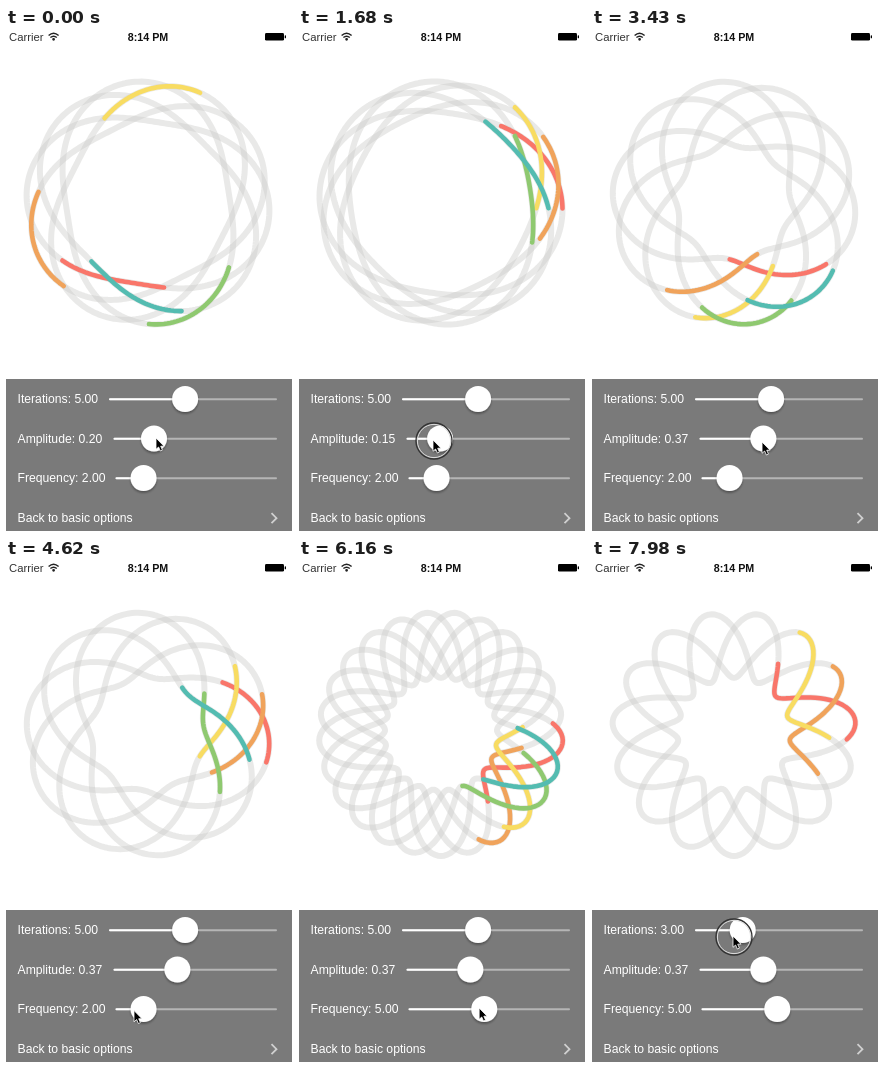
Animation of 287x503 px, one loop 8 s. Source, as an HTML page:

```html
<!DOCTYPE html>
<html lang="en">
<head>
<meta charset="utf-8">
<title>Rosette loader</title>
<style>
  html, body { margin: 0; width: 100%; height: 100%; overflow: hidden; background: #fff; }
  svg { display: block; width: 287px; height: 503px; font-family: "Liberation Sans", Arial, sans-serif; }
  .label { font-size: 12.2px; fill: #fff; }
  .base { fill: none; stroke: rgb(200, 200, 197); stroke-opacity: .4; stroke-width: 6; stroke-linejoin: round; }
  .dash { fill: none; stroke-width: 4.6; stroke-linecap: round; stroke-linejoin: round; }
</style>
</head>
<body>
<svg id="stage" viewBox="0 0 287 503">
  <defs>
    <filter id="shadow" x="-30%" y="-30%" width="160%" height="170%">
      <feDropShadow dx="0" dy="1.8" stdDeviation="1.3" flood-opacity=".35"/>
    </filter>
  </defs>
  <text x="3" y="12.6" font-size="11.3" fill="#333">Carrier</text>
  <g fill="none" stroke="#222" stroke-width="1.4">
    <path d="M42.6 7.6Q47.6 3 52.6 7.6M44.4 9.6Q47.6 6.7 50.8 9.6"/>
    <circle cx="47.6" cy="11.3" r=".7"/>
  </g>
  <text x="142" y="12.6" font-size="10.7" font-weight="bold" text-anchor="middle" fill="#111">8:14 PM</text>
  <rect x="259" y="5" width="19" height="7.6" rx="1.4"/>
  <rect x="278.7" y="7.3" width="1.3" height="3" rx=".6"/>
  <g id="rosette"></g>
  <rect y="351" width="286" height="152" fill="#7a7a7a"/>
  <g id="sliders"></g>
  <text class="label" x="11.5" y="494">Back to basic options</text>
  <path d="M265.5 485.2l5 5-5 5" fill="none" stroke="#d0d0d0" stroke-width="1.8"/>
  <g id="cursor">
    <g id="ring" fill="none">
      <circle cx="1" cy="1" r="18" stroke="#333" stroke-width="1.4"/>
      <circle cx="1" cy="1" r="16.6" stroke="#ddd" stroke-width="1"/>
    </g>
    <path d="M0 0V11.3L2.6 9 4.4 13 6.4 12.1 4.7 8.2H8Z" fill="#000" stroke="#fff" stroke-width=".8"/>
  </g>
</svg>
<script>
const LOOP = 8000, STEP = 70;
const CENTER = { x: 142, y: 175 }, RADIUS = 122;
const DASH = 0.16, POINTS = 240;
const COLORS = ["#f9766a", "#f0a35b", "#f8dc62", "#8fc970", "#54bcb1"];
const INITIAL_LEADS = [.395, .518, .806, .258, .388];
const FIRST_DRAG = 1150;
// Free running stretches: start, end, time per turn. Dragging keeps restarting the dashes.
const SPINS = [[3009, 5000, 1541], [5928, 7240, 1603]];
const PRESSES = [[1080, 2960], [4950, 5900], [7150, LOOP]];
const CURSOR = [
  [0, 150, 410], [450, 146, 451], [700, 146, 451], [950, 148, 432], [1080, 148, 412], [1150, 148, 412],
  [1680, 134, 412], [1850, 133, 413], [2520, 168, 414], [3000, 171, 414], [3450, 170, 414],
  [4180, 128, 451], [5000, 128, 452], [5900, 181, 449], [6200, 180, 449],
  [6700, 176, 373], [7210, 174, 373], [7540, 147, 376], [7980, 141, 377]
];
const SLIDERS = [
  { name: "Iterations", y: 371, left: 103, min: 1, max: 10, whole: true,
    keys: [[7200, 5], [7540, 3.45], [7980, 3.2]] },
  { name: "Amplitude", y: 410.5, left: 107.5, min: 0, max: 1,
    keys: [[1150, .2], [1680, .15], [1850, .13], [2520, .36], [3000, .37]] },
  { name: "Frequency", y: 450, left: 109.5, min: 1, max: 10, whole: true,
    keys: [[5000, 2], [5900, 5.17]] }
];
const TRACK_RIGHT = 271, THUMB = 13;

const byId = id => document.getElementById(id);
function add(parent, tag, attrs) {
  const node = document.createElementNS("http://www.w3.org/2000/svg", tag);
  for (const key in attrs) node.setAttribute(key, attrs[key]);
  return parent.appendChild(node);
}
function set(node, attrs) {
  for (const key in attrs) node.setAttribute(key, attrs[key]);
}
function interpolate(keys, t, column = 1) {
  const next = keys.findIndex(key => key[0] > t);
  if (next === 0) return keys[0][column];
  if (next < 0) return keys[keys.length - 1][column];
  const a = keys[next - 1], b = keys[next];
  return a[column] + (b[column] - a[column]) * (t - a[0]) / (b[0] - a[0]);
}

const bases = COLORS.map(() => add(byId("rosette"), "path", { class: "base" }));
const dashes = COLORS.map(color => add(byId("rosette"), "path", {
  class: "dash", stroke: color, pathLength: 1, "stroke-dasharray": `${DASH} ${1 - DASH}`
}));
for (const slider of SLIDERS) {
  const group = byId("sliders"), y = slider.y;
  slider.text = add(group, "text", { class: "label", x: 11.5, y: y + 4.3 });
  add(group, "rect", { x: slider.left, y: y - .8, width: TRACK_RIGHT - slider.left, height: 2, rx: 1, fill: "#b5b5b5" });
  slider.fill = add(group, "rect", { x: slider.left, y: y - .8, height: 2, rx: 1, fill: "#fff" });
  slider.thumb = add(group, "circle", { cy: y, r: THUMB, fill: "#fff", filter: "url(#shadow)" });
}

function wavePath(amplitude, frequency, phase) {
  const mean = RADIUS / (1 + amplitude);
  let d = "";
  for (let k = 0; k < POINTS; k++) {
    const angle = 2 * Math.PI * k / POINTS;
    const r = mean * (1 + amplitude * Math.sin(frequency * angle + phase));
    const x = CENTER.x + r * Math.cos(angle), y = CENTER.y + r * Math.sin(angle);
    d += `${k ? "L" : "M"}${x.toFixed(2)} ${y.toFixed(2)}`;
  }
  return d + "Z";
}

// Position of a dash's front end, as a fraction of the path length.
function leadAt(t, i) {
  if (t < FIRST_DRAG) return INITIAL_LEADS[i] + t / 1570;
  const spin = SPINS.find(([start, end]) => t >= start && t < end);
  return (spin ? (t - spin[0]) / spin[2] : .008) + (i % 2) * .05;
}

function updateSlider(slider, t) {
  const raw = interpolate(slider.keys, t);
  const first = slider.left + THUMB, last = TRACK_RIGHT - THUMB;
  const x = first + (last - first) * (raw - slider.min) / (slider.max - slider.min);
  const value = slider.whole ? Math.round(raw) : raw;
  slider.text.textContent = `${slider.name}: ${value.toFixed(2)}`;
  set(slider.thumb, { cx: x });
  set(slider.fill, { width: x - slider.left });
  return value;
}

function render(t) {
  const [count, amplitude, frequency] = SLIDERS.map(slider => updateSlider(slider, t));
  COLORS.forEach((_, i) => {
    const display = i < count ? "inline" : "none";
    const d = wavePath(amplitude, frequency, 2 * Math.PI * (i + 1) / count);
    set(bases[i], { d, display });
    set(dashes[i], { d, display, "stroke-dashoffset": 1 + DASH - leadAt(t, i) % 1 });
  });
  set(byId("cursor"), { transform: `translate(${interpolate(CURSOR, t, 1)} ${interpolate(CURSOR, t, 2)})` });
  const pressed = PRESSES.some(([start, end]) => t >= start && t < end);
  set(byId("ring"), { display: pressed ? "inline" : "none" });
}

const began = performance.now();
function frame() {
  const t = (performance.now() - began) % LOOP;
  render(Math.floor(t / STEP) * STEP);
  requestAnimationFrame(frame);
}
frame();
</script>
</body>
</html>
```
